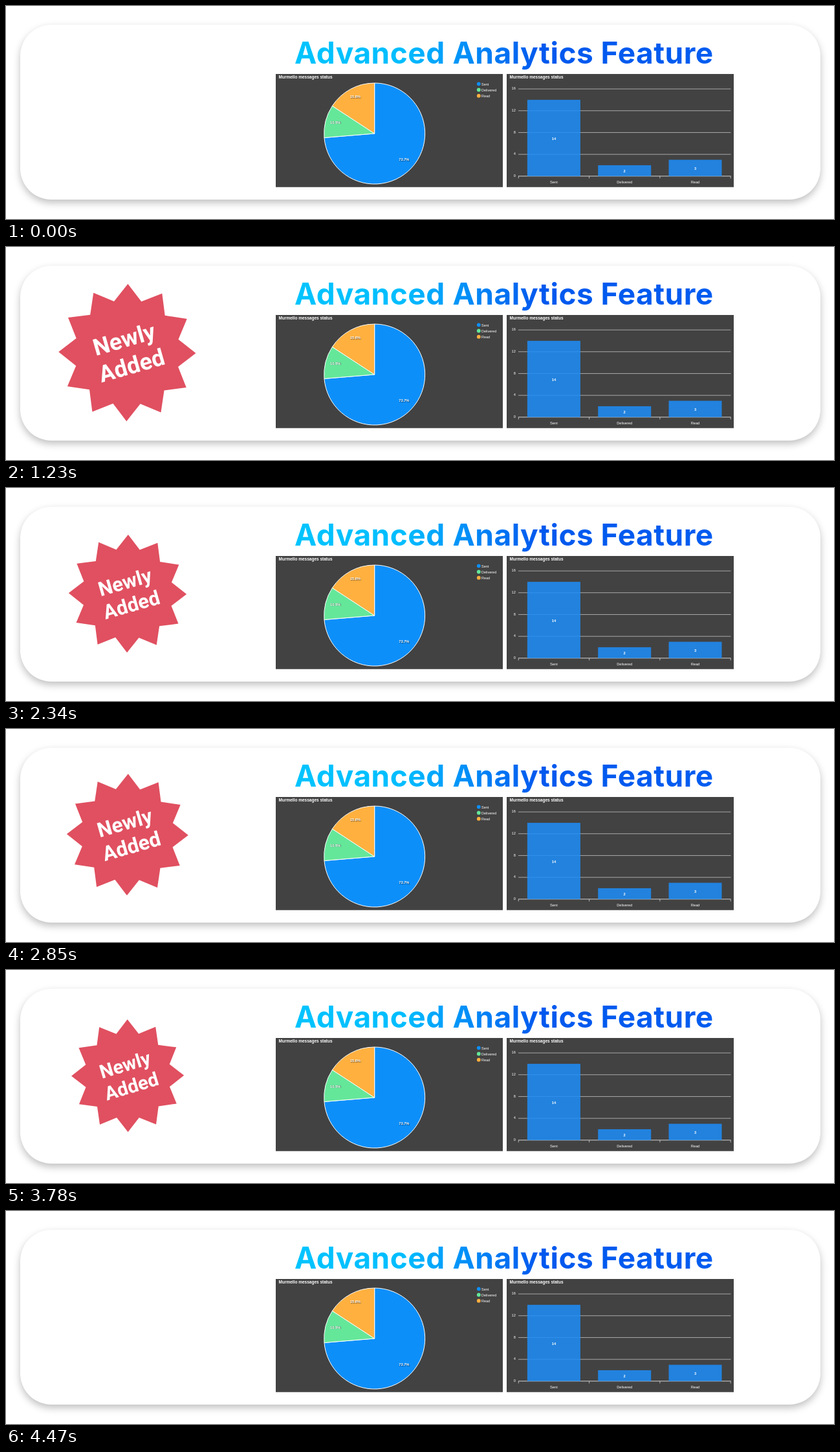
Recreate the animation shown at these times as an HTML page. Size 1280 by 329 pixels, loop 4500 ms.

```html
<!DOCTYPE html>
<html lang="en">
<head>
<meta charset="utf-8">
<title>Advanced Analytics Feature</title>
<style>
  html, body { margin: 0; width: 100%; height: 100%; overflow: hidden; background: #fff; }
  .card { position: absolute; left: 22px; top: 29px; width: 1237px; height: 270px; border-radius: 48px;
          background: #fff; box-shadow: 0 5px 12px rgba(0, 0, 0, .25); }
  svg { position: absolute; left: 0; top: 0; font-family: "Liberation Sans", Arial, sans-serif; }
  .title { font: 700 46px Inter, sans-serif; letter-spacing: .5px; }
  .head { font-weight: 700; font-size: 6.5px; }
  .value { font-weight: 700; font-size: 5.7px; text-anchor: middle; }
  .pie .value { text-shadow: .6px .6px 1px rgba(0, 0, 0, .6); }
  .badge { font: 700 33.8px Roboto, sans-serif; text-anchor: middle; }
</style>
</head>
<body>
<div class="card"></div>
<svg width="1280" height="329" viewBox="0 0 1280 329" fill="#fff">
  <defs>
    <linearGradient id="blue" gradientUnits="userSpaceOnUse" x1="447" x2="1097" y1="0" y2="0">
      <stop offset="0" stop-color="#00c4ff"/>
      <stop offset=".26" stop-color="#00bdff"/>
      <stop offset=".58" stop-color="#0058ee"/>
      <stop offset="1" stop-color="#005cf0"/>
    </linearGradient>
  </defs>
  <g class="title" fill="url(#blue)">
    <text x="446" y="88.7">Advanced</text>
    <text x="690.5" y="88.7">Analytics</text>
    <text x="919.5" y="88.7">Feature</text>
  </g>
  <path d="M417 105h351v174.700h-351zM774 105h351v174.700h-351z" fill="#424242"/>
  <g class="head">
    <text x="421.500" y="112.300">Murmello messages status</text>
    <text x="778.500" y="112.300">Murmello messages status</text>
  </g>
  <g id="pie" class="pie" font-size="5.500"></g>
  <g id="bars" font-size="5.700"></g>
  <g id="badge" class="badge">
    <polygon id="star" fill="#e05060"/>
    <g transform="translate(-4.100 -.9) rotate(-16)">
      <text x="1" y="-8">Newly</text>
      <text x="1" y="31.700">Added</text>
    </g>
  </g>
</svg>
<script>
const $ = id => document.getElementById(id);
const TAU = Math.PI * 2;
const names = ['Sent', 'Delivered', 'Read'];
const counts = [14, 2, 3];

const label = (x, y, s, attrs = '') => `<text x="${x}" y="${y}" ${attrs}>${s}</text>`;

function drawPie() {
  const cx = 569.7, cy = 197, r = 78;
  const colors = ['#0d8ffa', '#65e79a', '#ffb03f'];
  const spots = [[615.3, 239], [509.3, 181.8], [540, 142.3]];
  const at = f => `${cx + r * Math.sin(f * TAU)} ${cy - r * Math.cos(f * TAU)}`;
  let from = 0, slices = '', texts = '';
  counts.forEach((n, i) => {
    const part = n / 19, to = from + part, y = 120.3 + i * 9.2;
    slices += `<path d="M${cx} ${cy}L${at(from)}A${r} ${r} 0 ${+(part > .5)} 1 ${at(to)}Z"
      fill="${colors[i]}" stroke="#fff"/><circle cx="730.8" cy="${y}" r="2.9" fill="${colors[i]}"/>`;
    texts += label(...spots[i], (part * 100).toFixed(1) + '%', 'class="value"')
      + label(735, y + 2.2, names[i]);
    from = to;
  });
  $('pie').innerHTML = slices + texts;
}

function drawBars() {
  const base = 262.8, unit = 8.42;
  let grid = '', bars = '';
  for (let n = 0; n <= 16; n += 4) {
    const y = base - n * unit;
    grid += `<path d="M792 ${y}H1120.500" stroke="${n ? '#a8a8a8' : '#d0d0d0'}"/>`
      + label(787.8, y + 1.3, n, 'text-anchor="end"');
  }
  for (let i = 0; i < 4; i++)
    grid += `<path d="M${792.3 + i * 109.3} ${base}v3.500" stroke="#d0d0d0" stroke-width=".8"/>`;
  counts.forEach((n, i) => {
    const x = 846.9 + i * 109.3, h = n * unit;
    bars += `<rect x="${x - 41}" y="${base - h}" width="82" height="${h}" fill="#1d8ef9" opacity=".85"/>`
      + label(x, base - h / 2 + 3, n, 'class="value"')
      + label(x, 274.2, names[i], 'text-anchor="middle"');
  });
  $('bars').innerHTML = grid + bars;
}

// The star sits slightly off the pivot it turns and grows about
function drawStar() {
  const points = [];
  for (let i = 0; i < 24; i++) {
    const r = i % 2 ? 77 : 100, a = i * TAU / 24 + .01;
    points.push((r * Math.sin(a) - 4.1).toFixed(2) + ',' + (-r * Math.cos(a) - .9).toFixed(2));
  }
  $('star').setAttribute('points', points.join(' '));
}

// Spin in with overshoot, pulse, spin out: [ms, value]
const loop = 4500;
const size = [[0, 0], [180, .33], [400, 1.09], [460, 1.125], [540, 1.098], [820, 1],
  [3950, 1], [4080, .977], [4320, .33], [4470, 0], [4500, 0]];
const tilt = [[0, -180], [180, -126], [420, -19], [540, -7], [800, 0],
  [3700, 0], [3960, -7], [4080, -19], [4320, -126], [4500, -180]];

const smooth = u => u * u * (3 - 2 * u);
const clamp = u => Math.min(1, Math.max(0, u));

// The pulse fades in after the entrance has come to rest
const pulse = t => 1 + .14 * smooth(clamp((t - 850) / 520)) * Math.cos((t - 360) / 750 * TAU);

// Smooth curve through the keys
function curve(keys, t) {
  let i = 1;
  while (i < keys.length - 1 && t > keys[i][0]) i++;
  const [t0, a] = keys[i - 1], [t1, b] = keys[i], d = t1 - t0, u = (t - t0) / d;
  const slope = k => {
    const p = keys[k - 1], q = keys[k], n = keys[k + 1];
    if (!p || !n) return 0;
    const m0 = (q[1] - p[1]) / (q[0] - p[0]), m1 = (n[1] - q[1]) / (n[0] - q[0]);
    return m0 * m1 > 0 ? 2 * m0 * m1 / (m0 + m1) : 0;
  };
  return a + (b - a) * smooth(u) + d * u * (1 - u) * (slope(i - 1) * (1 - u) - slope(i) * u);
}

function draw(now) {
  const t = now % loop;
  $('badge').setAttribute('transform',
    `translate(191.7 164) rotate(${curve(tilt, t)}) scale(${curve(size, t) * pulse(t)})`);
  requestAnimationFrame(() => draw(performance.now() - start));
}

drawPie();
drawBars();
drawStar();
const start = performance.now();
draw(0);
</script>
</body>
</html>
```
